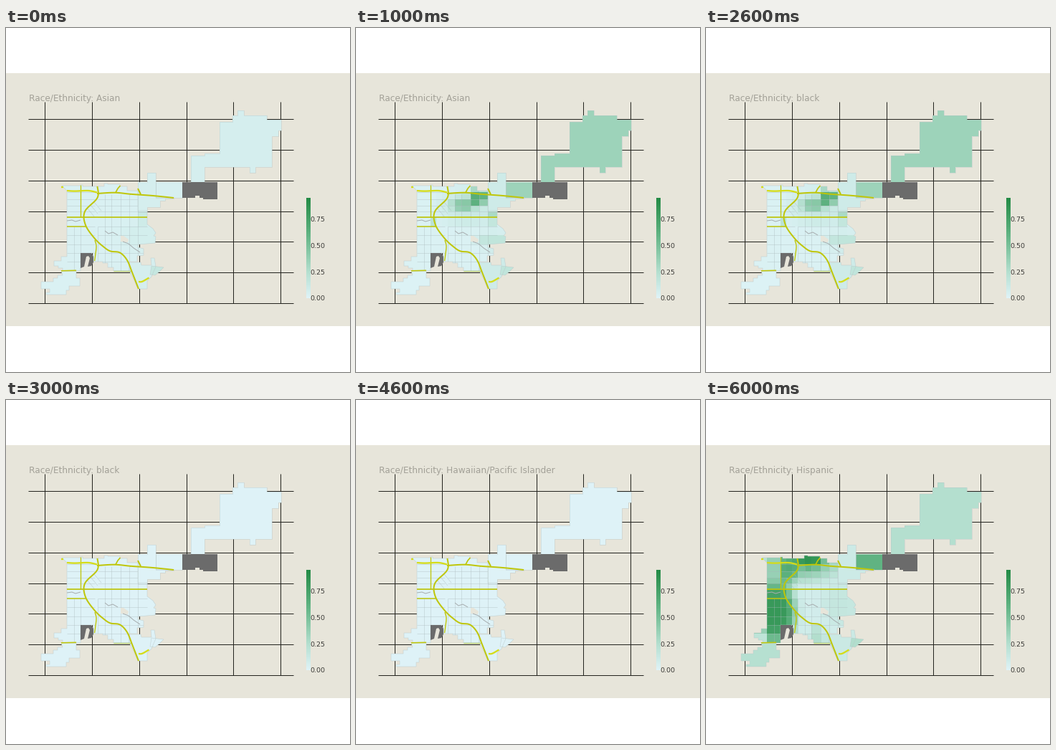
Animation of 480 by 480 pixels, one loop 7 s. Source, as a matplotlib script:

```python
import matplotlib.pyplot as plt
import numpy as np
from matplotlib.animation import FuncAnimation
from matplotlib.colors import LinearSegmentedColormap
from matplotlib.patches import Polygon, Rectangle

SIZE, DPI = 480, 100
PX = 72 / DPI
FONT = "DejaVu Sans"
BEIGE, GREY, INK = "#e7e5da", "#6b6b6b", "#24241f"
OLIVE, YELLOW = "#bfc60a", "#d5dc18"
TOP = 0.95
GREENS = LinearSegmentedColormap.from_list("greens", [
    (0, "#dff3f8"), (0.25 / TOP, "#b4dfcf"), (0.6 / TOP, "#62b484"),
    (1, "#238b45")])

fig = plt.figure(figsize=(SIZE / DPI, SIZE / DPI), dpi=DPI, facecolor="white")
ax = fig.add_axes([0, 0, 1, 1])
ax.axis("off")


def stairs(x, y, *moves):
    """Corners of a path that turns between sideways and vertical moves."""
    points = [(x, y)]
    for i, move in enumerate(moves):
        x, y = (x, move) if i % 2 else (move, y)
        points.append((x, y))
    return points


def smooth(points, steps=8):
    """Catmull-Rom curve through the points."""
    p = np.array([points[0], *points, points[-1]], float)
    t = np.linspace(0, 1, steps)[:, None]
    parts = [b + t / 2 * (c - a + t * (2 * a - 5 * b + 4 * c - d
                                       + t * (3 * (b - c) + d - a)))
             for a, b, c, d in zip(p, p[1:], p[2:], p[3:])]
    return np.vstack(parts)


def area(points, fill="none", z=3, edge="none"):
    return ax.add_patch(Polygon(points, fc=fill, ec=edge, lw=0.6 * PX,
                                zorder=z))


def line(points, color=OLIVE, width=2.0, z=8, **style):
    x, y = zip(*points)
    return ax.plot(x, y, color=color, lw=width * PX, zorder=z,
                   solid_capstyle="butt", solid_joinstyle="round", **style)[0]


# Districts, in stage pixels
CITY = (
    stairs(78, 220, 104, 219, 107, 221, 137, 217, 142, 218, 159, 221, 169,
           227, 184, 255, 197, 274)
    + [(205, 280), (209, 286), (206, 290), (209, 291), (208, 300), (185, 302),
       (184, 306), (192, 308), (192, 317), (183, 318)]
    + stairs(183, 326, 172, 339, 150, 334, 142, 328, 135, 326, 122, 314, 104,
             339, 79, 335, 73, 332, 67, 325, 77, 319, 85, 227))
SOUTHWEST = stairs(77, 339, 98, 349, 103, 360, 88, 366, 84, 372, 56, 369, 61,
                   364, 49, 354, 66, 349, 72, 345, 79)
LOBE = [(203, 332), (220, 334), (214, 340), (208, 345), (201, 344)]
SOUTHEAST = [(172, 327), (188, 327), (189, 331), (203, 331), (202, 321),
             (207, 321), (209, 333), (203, 347), (197, 353), (197, 364),
             (184, 364), (178, 350), (172, 339)]
EASTSIDE = stairs(184, 215, 197, 202, 209, 236, 234, 238, 222, 241, 215, 250,
                  197, 257, 184)
STRIP = stairs(209, 215, 246, 237, 209)
NORTHEAST = stairs(298, 131, 316, 122, 323, 115, 332, 122, 364, 128, 384, 143,
                   380, 151, 371, 194, 348, 202, 340, 194, 277, 215, 258, 178,
                   277, 175, 298)
DISTRICTS = [CITY, SOUTHWEST, SOUTHEAST, LOBE, EASTSIDE, STRIP, NORTHEAST]

# City blocks
COLS = np.array([66, 85, 104, 112, 120, 128, 138, 147, 160, 172, 184, 197, 210])
ROWS = np.array([216, 229, 239, 248, 256, 264, 277, 289, 302, 314, 326, 340])
MID_X, MID_Y = np.meshgrid((COLS[1:] + COLS[:-1]) / 2,
                           (ROWS[1:] + ROWS[:-1]) / 2)


def bump(cx, cy, rx, ry, height):
    """Flat-topped hill of shares, sampled at the middle of each block."""
    r2 = ((MID_X - cx) / rx) ** 2 + ((MID_Y - cy) / ry) ** 2
    return height * np.exp(-r2 ** 2)


def population(base, outer, *bumps):
    """Artists of one map: the outer districts and the blocks of the city."""
    artists = [area(shape, GREENS(share / TOP))
               for shape, share in zip(DISTRICTS, [base, *outer])]
    shares = base + sum((bump(*b) for b in bumps), np.zeros_like(MID_X))
    mesh = ax.pcolormesh(COLS, ROWS, shares, cmap=GREENS, vmin=0, vmax=TOP,
                         zorder=4)
    mesh.set_clip_path(artists[0])
    return artists + [mesh]


asian = population(0.04, [0.03, 0.06, 0.15, 0.06, 0.05, 0.06],
                   (190, 264, 7, 7, 0.1), (190, 290, 30, 20, 0.03))
black = population(0.03, [0.02, 0.1, 0.18, 0.1, 0.35, 0.35],
                   (171, 234, 13, 13, 0.55), (150, 246, 18, 11, 0.31),
                   (158, 250, 45, 28, 0.1), (190, 264, 7, 7, 0.22),
                   (195, 296, 28, 12, 0.15), (108, 271, 6, 9, 0.18))
islander = population(0.01, [0.01] * 6)
hispanic = population(0.08, [0.24, 0.12, 0.26, 0.11, 0.61, 0.25],
                      (98, 296, 27, 45, 0.76), (132, 226, 58, 27, 0.36),
                      (145, 223, 20, 11, 0.44), (115, 236, 14, 22, 0.25),
                      (190, 285, 28, 30, 0.08), (155, 330, 12, 14, 0.18))
MAPS = [asian, black, islander, hispanic]
NAMES = ["Asian", "black", "Hawaiian/Pacific Islander", "Hispanic"]

# Backdrop and graticule, on whole pixels
ax.add_patch(Rectangle((0, 63), SIZE, 353, fc=BEIGE, ec="none", zorder=0))
for x in np.floor(np.linspace(54.65, 383.7, 6)):
    line([(x, 103), (x, 384)], INK, 1, 1)
for y in np.floor(np.linspace(127.7, 384.5, 7)):
    line([(31, y), (401, y)], INK, 1, 1)

# Block and district borders
borders = [[(85, y), (124, y)] for y in ROWS[1:]]
borders += [[(128, y), (197, y)] for y in ROWS[2:-1]]
borders += [[(x, 232), (x, 339)] for x in COLS[6:11]]
borders += [[(x, 277), (x, 339)] for x in (95, 104, 128)]
borders += [[(113 + 5 * k, 251 - 4 * k), (123 + 5 * k, 263 - 4 * k)]
            for k in range(3)]
for border in borders:
    line(border, "#a9b8ba", 0.7, 5, alpha=0.5).set_clip_path(asian[0])
for shape in DISTRICTS:
    area(shape, z=5, edge="#b9c8c8b0")

# Areas without data
area([(160, 290), (164, 290), (171, 295), (170, 299), (160, 298)], BEIGE, 6)
area(stairs(246, 215, 295, 239, 275, 237, 270, 234, 264, 237, 246), GREY, 6)
area([(104, 314), (119, 314), (122, 319), (122, 327), (119, 332), (114, 333),
      (117, 321), (115, 318), (112, 319), (109, 333), (104, 335)], GREY, 6)

# Streets and highways
for street in ([(85, 269), (92, 268), (97, 270), (104, 268)],
               [(138, 283), (143, 287), (149, 285), (156, 289)],
               [(163, 298), (171, 301), (178, 307), (187, 313)]):
    line(street, "#a7adaf", 1, 7)
line([(104, 218.5), (104, 264)], width=1.3)
line([(85, 264), (197, 264)], width=1.7)
line([(85, 276.6), (111, 276.6)], width=1.5)
line([(77, 338.8), (98, 338.3)], width=1.6)
line([(150, 339), (175, 339)], "#b5cc6a", 1.2)
line(smooth([(124, 296), (126, 304), (125, 315), (123.5, 325)]), width=1.4)
line([(184, 224), (186, 228), (188, 232)])
line([(159.5, 220), (156, 224), (153, 229.5)], width=1.7)
line(smooth([(127, 231), (152, 229.7), (174, 231.8), (205, 234), (234, 237)]))
line(smooth([(127.5, 221), (127.5, 237), (110, 256), (111, 275), (124, 294),
             (137, 306), (146, 311.5), (159, 313.5), (169, 324), (176, 341),
             (185, 364)]))
for part in ([(85, 227), (96, 227.6), (115, 227), (127, 229.5)],
             [(185, 354), (190, 353.8), (199.5, 348.5)],
             [(77, 222), (79.5, 222)]):
    line(smooth(part), YELLOW, 2.3)

# Colour key
ax.imshow(np.linspace(TOP, 0, 200)[:, None], cmap=GREENS, aspect="auto",
          extent=(419, 425, 377.5, 237.5), zorder=3)
for value in (0, 0.25, 0.5, 0.75):
    ax.text(424.2, 376.8 - 146.4 * value, f"{value:.2f}", size=9.5 * PX,
            family=FONT, color="#3c3b38", va="center_baseline", zorder=9)
title = ax.text(31.5, 102, "", size=12.08 * PX, family=FONT, color="#a3a198",
                va="baseline", zorder=9)
ax.set(xlim=(0, SIZE), ylim=(SIZE, 0))


def update(i):
    # The map switches one step before its heading does.
    title.set_text("Race/Ethnicity: " + NAMES[i // 2])
    for k, artists in enumerate(MAPS):
        for artist in artists:
            artist.set_visible(k == (i + 1) // 2)
    return []


anim = FuncAnimation(fig, update, frames=7, interval=1000, repeat=True,
                     repeat_delay=0, blit=False)
plt.show()
```
